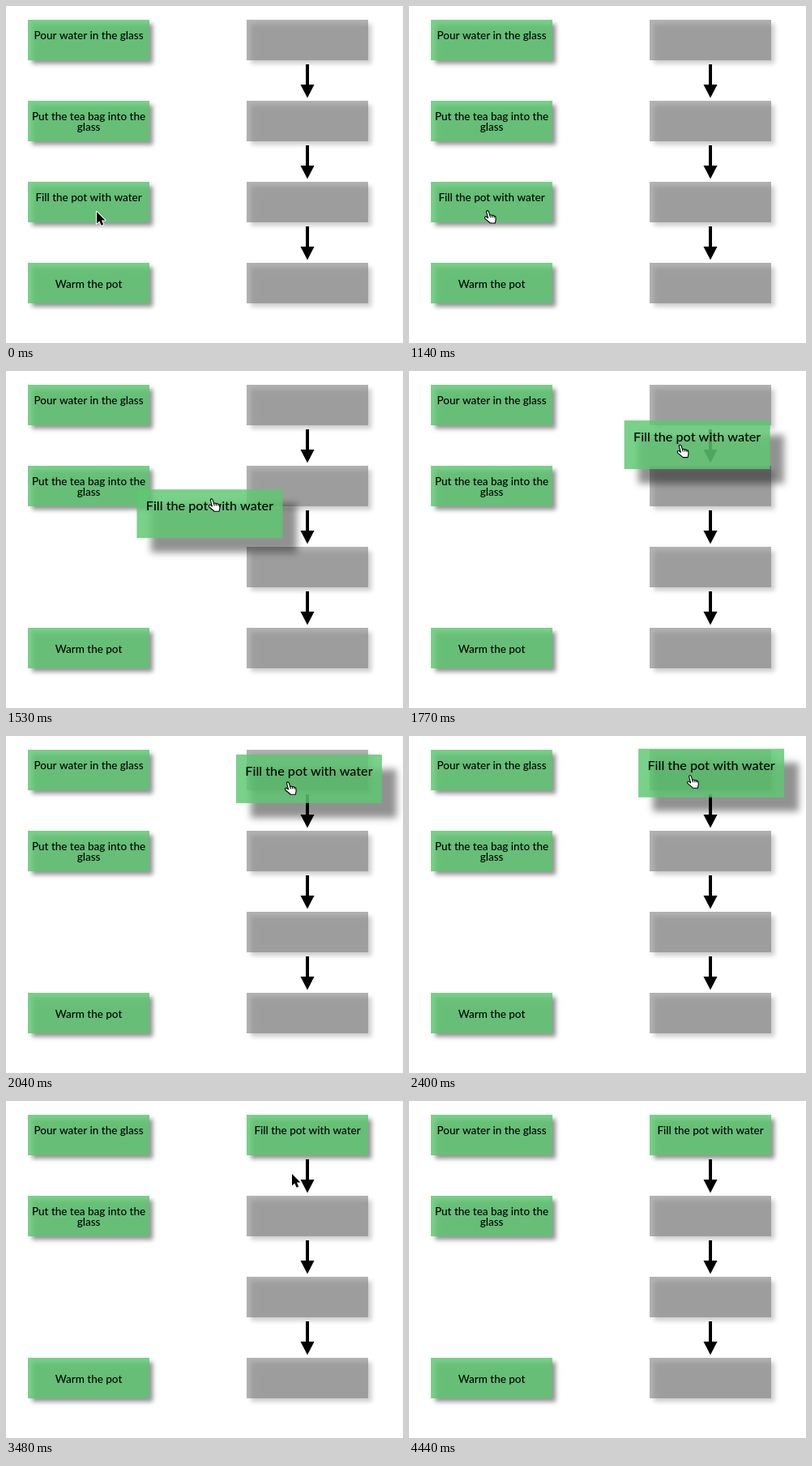
An HTML page with a canvas that plays this animation: 490x416 px, repeating every 4.86 s.

```html
<!DOCTYPE html>
<html lang="en">
<head>
<meta charset="utf-8">
<title>Tea steps</title>
<style>
html, body { margin: 0; overflow: hidden; background: #fff; }
canvas { display: block; }
</style>
</head>
<body>
<canvas id="stage" width="490" height="416"></canvas>
<script>
const ctx = document.getElementById('stage').getContext('2d');
const LOOP = 4860, TICK = 30;
const W = 150, H = 50, LEFT = 27, RIGHT = 297;
const GRAB = 510, DRAG = 1140, HOVER = 2190, DROP = 2880, LEAVE = 4260;
const rowY = i => 17 + 100 * i;

const arrowShape = new Path2D('M0 0V14.5L3.3 11.4L5.6 16.8L8.2 15.7L5.9 10.4H10.4Z');
const handShape = new Path2D('M-1.7 .8C-1-.9 1-.8 1.5 1L3 6C4 5 5.5 5.2 6 6.4C7 5.5 8.3 5.8 8.8 7' +
  'C10 6.6 11 7.3 11 8.5L11.3 12L10.3 16.7H3.8L-3.4 10.6C-4.8 8.5-2.8 7-1.5 8L.6 9.7Z');
const knuckles = new Path2D('M3 6L4 9M6 6.4L6.7 9M8.8 7L9.2 9.2');

const part = (t, from, to) => Math.min(1, Math.max(0, (t - from) / (to - from)));
const smooth = u => u * u * (3 - 2 * u);
const glide = (t, from, to) => smooth(part(t, from, to));
// Drag progress: a higher power starts later, a higher rush arrives sooner
const drag = (t, power, rush) => 1 - (1 - part(t, DRAG, HOVER) ** power) ** rush;

function cardPose(t) {
  const hover = glide(t, HOVER, 2640), drop = glide(t, DROP, 3450);
  return [
    LEFT + 257 * drag(t, 2.4, 7.6) - 2 * hover + 15 * drop,
    rowY(2) - 195 * drag(t, 2.4, 4.63) - 14 * hover + 9 * drop,
    1 + .2 * (glide(t, DRAG, 1380) - drop)
  ];
}

function pointerPose(t) {
  const grab = glide(t, GRAB, 720), hover = glide(t, HOVER, 2640);
  const drop = glide(t, DROP, 3060), rest = glide(t, 3030, 3390), leave = part(t, LEAVE, 4440);
  return [
    112 - 15 * grab + 251 * drag(t, 2, 6.6) - 2 * hover + 14 * drop - 7 * rest + 77 * leave,
    254 - grab - 198 * drag(t, 1.65, 3) - 13 * hover + 48 * drop - 112 * leave
  ];
}

// Translucent box above its own soft shadow
function box(x, y, s, color, shade) {
  const lift = s - 1, far = 1000, off = 4.5 + lift * 66;
  ctx.save();
  ctx.shadowColor = `rgba(0,0,0,${shade})`;
  ctx.shadowBlur = 5.5 + lift * 15;
  ctx.shadowOffsetX = far + off;
  ctx.shadowOffsetY = off;
  ctx.fillStyle = '#000';
  ctx.fillRect(x - far, y, W * s, H * s);
  ctx.restore();
  ctx.fillStyle = color;
  ctx.fillRect(x, y, W * s, H * s);
}

function card(x, y, s, base, ...lines) {
  box(x, y, s, 'rgba(94,200,115,.83)', .43);
  ctx.fillStyle = '#000';
  ctx.font = `500 ${13.5 * s}px Lato, "Open Sans", sans-serif`;
  ctx.textAlign = 'center';
  lines.forEach((line, i) =>
    ctx.fillText(line, x + W * s / 2, y + base + 10 * (s - 1) + i * 13));
}

function downArrow(y) {
  ctx.fillStyle = '#000';
  ctx.fillRect(370, y, 4, 27);
  ctx.beginPath();
  ctx.moveTo(363.5, y + 25);
  ctx.lineTo(380.5, y + 25);
  ctx.lineTo(372, y + 41.5);
  ctx.fill();
}

function pointer(x, y, isHand) {
  ctx.save();
  ctx.translate(x, y);
  ctx.lineJoin = 'round';
  if (isHand) {
    ctx.scale(.9, .9);
    ctx.fillStyle = '#fff';
    ctx.strokeStyle = '#000';
    ctx.lineWidth = 1.2;
    ctx.fill(handShape);
    ctx.stroke(handShape);
    ctx.stroke(knuckles);
  } else {
    ctx.fillStyle = '#000';
    ctx.strokeStyle = '#fff';
    ctx.lineWidth = 2;
    ctx.stroke(arrowShape);
    ctx.fill(arrowShape);
  }
  ctx.restore();
}

function draw(t) {
  ctx.fillStyle = '#fff';
  ctx.fillRect(0, 0, 490, 416);
  // The first slot gives way to the dropped card
  for (let i = t < DROP ? 0 : 1; i < 4; i++) box(RIGHT, rowY(i), 1, 'rgba(127,127,127,.6)', .2);
  for (let i = 0; i < 3; i++) downArrow(rowY(i) + 55);
  card(LEFT, rowY(0), 1, 24, 'Pour water in the glass');
  card(LEFT, rowY(1), 1, 24, 'Put the tea bag into the', 'glass');
  card(LEFT, rowY(3), 1, 31, 'Warm the pot');
  card(...cardPose(t), 24, 'Fill the pot with water');
  pointer(...pointerPose(t), t >= GRAB && t < DROP + 90);
}

function tick(now) {
  draw(Math.floor(now % LOOP / TICK) * TICK);
  requestAnimationFrame(tick);
}
requestAnimationFrame(tick);
</script>
</body>
</html>
```
